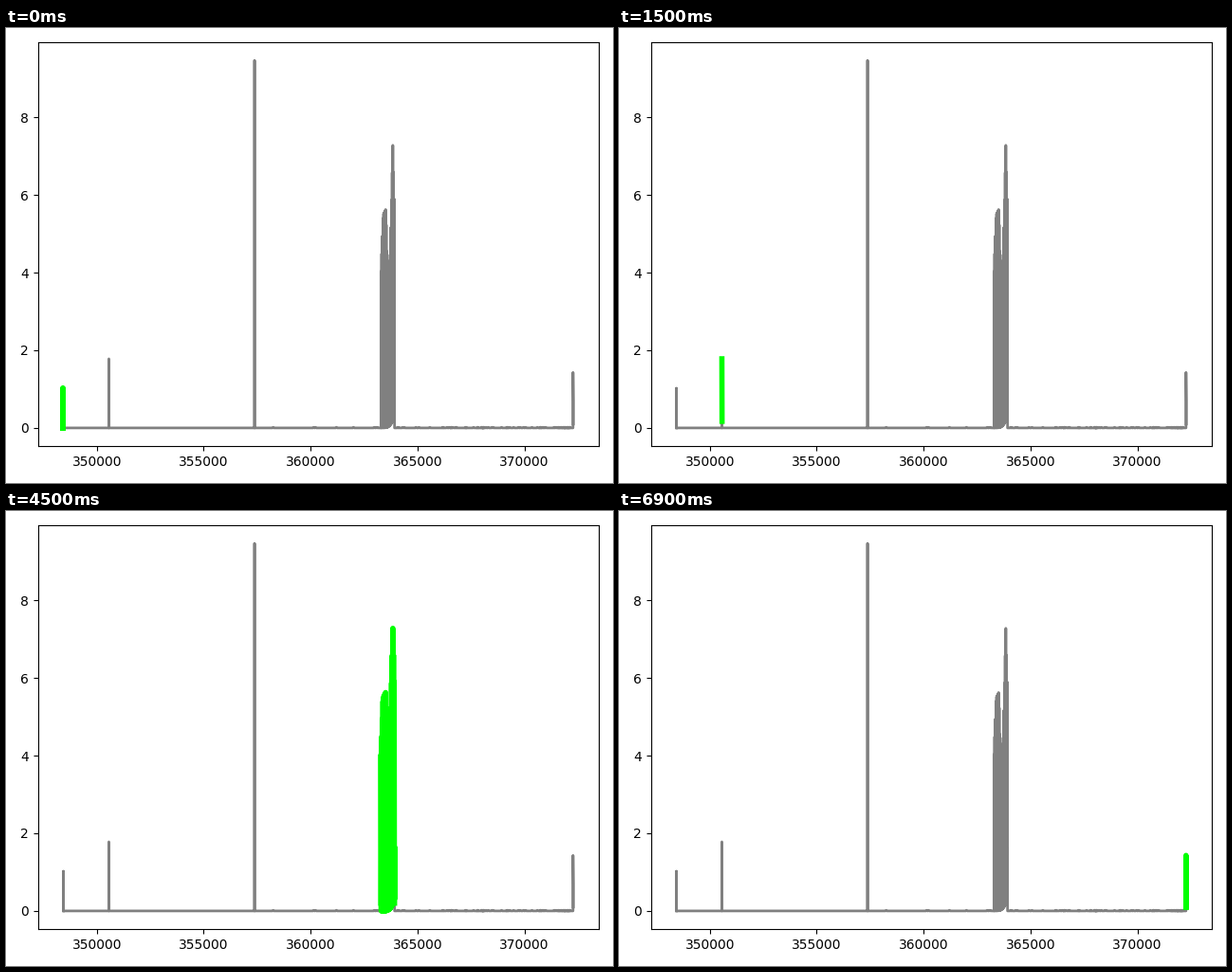
Recreate the animation shown at these times as a matplotlib script. Size 640 px wide and 480 px high, loop 7.5 s.

```python
import numpy as np
import matplotlib.pyplot as plt
from matplotlib.animation import FuncAnimation

START, END = 348435, 372287
rng = np.random.default_rng(4)


def spike(x, base, peak, floor, drift=0):
    """Rise from base to peak, then drop to floor while drifting right."""
    return [(x, base), (x, peak), (x + drift, floor)]


def cluster(first, last, count):
    """Dense oscillation under a two-humped envelope with a rising floor."""
    u = np.linspace(0, 1, count)
    peaks = np.interp(u, [0, 0.16, 0.37, 0.46, 0.66, 0.9, 1],
                      [4.03, 5.49, 5.64, 4.41, 3.9, 7.28, 5.9])
    floors = 0.3 * u**4
    x = first + (last - first) * u
    pts = [(first, 0.2)]
    for xi, peak, floor in zip(x, peaks, floors):
        pts += [(xi, peak), (xi + 12, floor)]
    return pts + [(last + 18, 1.65), (last + 18, 0.2)]


def baseline(left, right, ripples):
    """Flat stretch between two bursts with faint ripples."""
    inside = ripples[(ripples > left + 100) & (ripples < right - 100)]
    pts = [(left, 0)]
    for x in inside:
        pts += [(x - 30, 0), (x, 0.017), (x + 30, 0)]
    return pts + [(right, 0)]


bursts = [
    spike(START, 0, 1.02, 0),
    spike(350564, 1.78, 1.78, 0.17, drift=8),
    spike(357378, 3.15, 9.462, 0.28),
    cluster(363292, 363908, 21),
    spike(372274, 0.1, 1.43, 0.7, drift=END - 372274) + [(END, 0.1)],
]

# Ripples crowd towards the end of the recording
ripples = np.sort(START + (END - START) * rng.random(75) ** 0.28)

points = list(bursts[0])
for left, right in zip(bursts, bursts[1:]):
    points += baseline(left[-1][0], right[0][0], ripples) + right

fig, ax = plt.subplots(figsize=(6.4, 4.8), dpi=100)
ax.plot(*zip(*points), color="gray", lw=2)
marker, = ax.plot([], [], color="lime", lw=4)
fig.tight_layout()


def update(i):
    marker.set_data(*zip(*bursts[i]))
    return marker,


anim = FuncAnimation(fig, update, frames=len(bursts), interval=1500,
                     repeat=True, repeat_delay=0)
plt.show()
```
